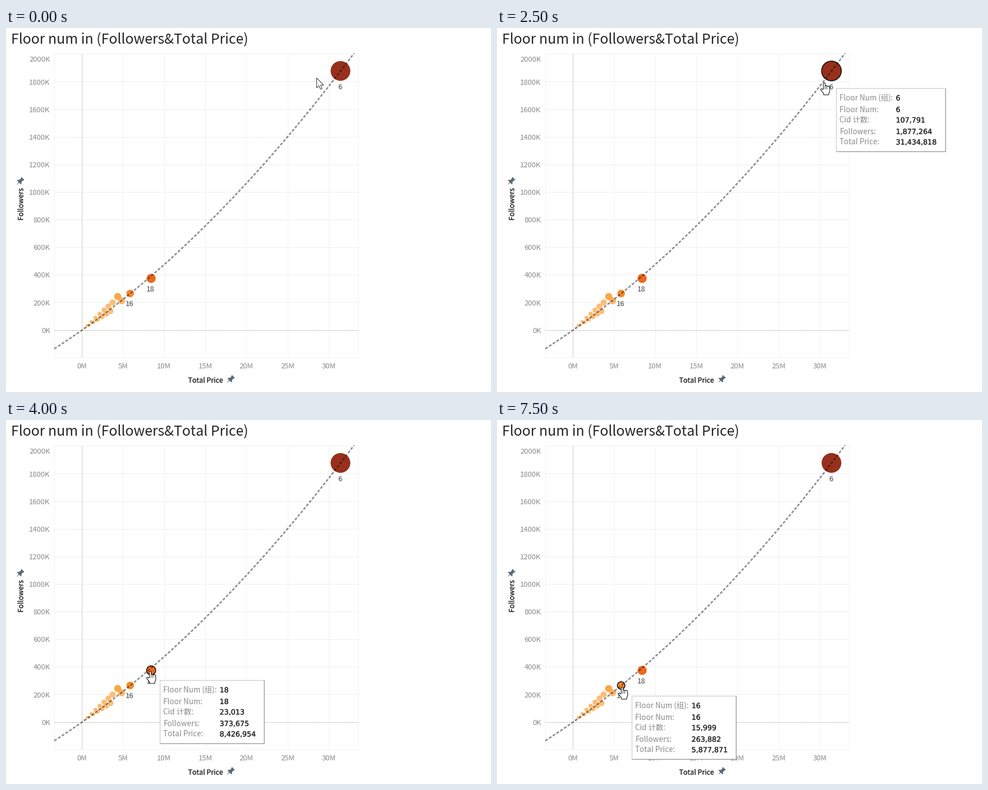
A matplotlib script for the animation above (8 s loop, 864 by 648 pixels).

```python
import numpy as np
import matplotlib.pyplot as plt
from matplotlib.animation import FuncAnimation
from matplotlib.patches import Circle, Polygon, Rectangle
from matplotlib.patheffects import withStroke

W, H = 864, 648
STEP_MS, STEPS = 500, 16
SANS, WIDE = "Noto Sans CJK JP", "DejaVu Sans"
GRAY, INK, SLATE = "#8a8a8a", "#262626", "#5a6877"
FAINT, MID = "#f1f1f1", "#b4b4b4"
LEFT, RIGHT, TOP, BOTTOM = 85.5, 626.5, 45.5, 585.5

plt.rcParams["lines.scale_dashes"] = False

# At 72 dpi one point is one pixel.
fig = plt.figure(figsize=(W / 72, H / 72), dpi=72, facecolor="white")
ax = fig.add_axes([0, 0, 1, 1])
ax.set_xlim(0, W)
ax.set_ylim(H, 0)
ax.axis("off")


def x_of(price):
    return 135 + 14.66e-6 * price


def y_of(followers):
    return 537.5 - 0.2456e-3 * followers


def r_of(count):
    return 0.0535 * np.sqrt(count)


def text(x, y, s, size, color=GRAY, font=SANS, z=1, bold=0, **kw):
    t = ax.text(x, y, s, fontsize=size, color=color, family=font, zorder=z,
                va="baseline", **kw)
    if bold:
        t.set_path_effects([withStroke(linewidth=bold, foreground=color)])
    return t


def line(xs, ys, color, width=1, dash=None, z=1, cap="butt", **kw):
    style = (0, dash) if dash else "-"
    return ax.plot(xs, ys, color=color, lw=width, ls=style, zorder=z,
                   dash_capstyle="butt", solid_capstyle=cap, **kw)[0]


def shape(points, origin, fill, edge="none", width=0, z=1):
    return ax.add_patch(Polygon(np.array(points) + origin, fc=fill, ec=edge,
                                lw=width, zorder=z, joinstyle="round"))


def disc(x, y, r, fill, edge="none", width=0, z=3):
    return ax.add_patch(Circle((x, y), r, fc=fill, ec=edge, lw=width,
                               zorder=z))


# ---- static chart ----

def pin(x, y):
    half = np.array([(3.5, -8), (3.5, -6.3), (2.4, -5.5), (2.8, -1.5),
                     (5, .5), (5, 2), (.8, 2), (0, 8.5)])
    outline = np.vstack([half, half[::-1] * (-1, 1)])
    c = np.sqrt(.5)
    shape(outline @ np.array([[c, c], [-c, c]]), (x, y), SLATE)


def draw_grid():
    for m in range(0, 31, 5):
        x = x_of(m * 1e6)
        if m:
            line([x, x], [TOP, BOTTOM], FAINT)
        text(x, 606.5, f"{m}M", 13, ha="center")
    for k in range(0, 2001, 200):
        y = y_of(k * 1e3)
        if 0 < k < 2000:
            line([LEFT - 1, RIGHT], [y, y], "#e6e6e6", dash=(2, 1))
        text(78.5, max(y + .5, 55) + 4.7, f"{k}K", 13, ha="right")
    line([LEFT, RIGHT, RIGHT, LEFT, LEFT],
         [TOP, TOP, BOTTOM, BOTTOM, TOP], FAINT)
    line([x_of(0)] * 2, [TOP, BOTTOM], MID, dash=(2, 1))
    line([LEFT, RIGHT], [y_of(0)] * 2, MID, dash=(2, 1))


def draw_titles():
    text(9.3, 28.5, "Floor num in (Followers&Total Price)", 24.85, INK)
    text(324.5, 631.3, "Total Price", 12.4, INK, bold=.1)
    text(30.5, 314, "Followers", 12.7, INK, bold=.1, rotation=90,
         rotation_mode="anchor", ha="center")
    pin(399.5, 626)
    pin(24.5, 273.5)


# Floor: count, followers, total price, colour.
FLOORS = {"16": (15999, 263882, 5877871, "#f28a2c"),
          "18": (23013, 373675, 8426954, "#ea6a1c"),
          "6": (107791, 1877264, 31434818, "#97301c")}


def place(name):
    count, followers, price, _ = FLOORS[name]
    return x_of(price), y_of(followers), r_of(count)


def draw_marks():
    # Minor floors keep close to a fixed count and follower rate per price.
    for i, price in enumerate(np.linspace(1e5, 3.75e6, 15)):
        rate = .046 + .007 * (-1) ** i
        disc(x_of(price), y_of(rate * price), r_of(.0028 * price), "#fcbd78")
    disc(206, 485.5, 6.2, "#fbb56a")
    disc(199, 478, 6.3, "#f9a848")
    for name, record in FLOORS.items():
        x, y, r = place(name)
        disc(x, y, r, record[-1])
        text(x - 1, y + r + 15.3, name, 13.2, "#404040", z=4, ha="center")


def draw_trend():
    x = np.linspace(86, 620, 200)
    u = x - 86
    y = 571 - .75 * u - .000649 * u * (x - 258)
    line(x, y, "black", 2.6, (5, 3), z=5, alpha=.45)


# ---- pointer and tooltip ----

def arrow(x, y):
    outline = [(0, 0), (0, 17.5), (4, 13.8), (6.8, 20), (9.6, 18.8),
               (6.9, 12.8), (12.4, 12.6)]
    return [shape(outline, (x, y), "white", "#333333", 1, z=20)]


def hand(x, y):
    palm = [(-1, 12), (9.3, 12), (9.3, 15.5), (7.6, 19), (7.6, 21.5),
            (-.8, 21.5), (-.8, 19.5), (-4, 14)]
    fingers = [((2.8 * i, 2.8 * i), (1.8 + 4.2 * min(i, 1) + .8 * i, 14))
               for i in range(4)]
    strokes = fingers + [((-4.8, 0), (12.6, 18))]
    parts = []
    # A wide dark pass under a narrow white one leaves the outline.
    for color, grow, z in (("black", 1, 20), ("white", 0, 21)):
        parts += [line(np.add(xs, x), np.add(ys, y), color, 2.2 + 2 * grow,
                       z=z, cap="round") for xs, ys in strokes]
        parts.append(shape(palm, (x, y), color, color, 2 * grow, z=z))
    return parts


LABELS = ["Floor Num (组):", "Floor Num:", "Cid 计数:", "Followers:",
          "Total Price:"]


def box(x, y, w, h, fill, edge="none", z=10):
    return ax.add_patch(Rectangle((x, y), w, h, fc=fill, ec=edge, lw=1,
                                  zorder=z))


def tooltip(name, x, y):
    values = [name, name] + [f"{v:,}" for v in FLOORS[name][:3]]
    w, h = 104 + 9 * len(values[-1]), 112
    parts = [box(x + 1, y + 1, w + 2, h + 2, "#d0d0d0"),
             box(x + 1.5, y + 1.5, w + 1, h + 1, "#adadad"),
             box(x + .5, y + .5, w, h, "white", "#c4c4c4", z=11)]
    for i, (label, value) in enumerate(zip(LABELS, values)):
        base = y + 23 + 19.6 * i + i % 2
        parts.append(text(x + 7.3, base, label, 13.4, z=12))
        parts.append(text(x + 107.5, base, value, 12.7, INK, WIDE, z=12,
                          bold=.25))
    return parts


def hover(name, tip):
    """Outline a mark; its tooltip hangs off the last point inside it."""
    x, y, r = place(name)
    offset = np.subtract(tip, (x, y))
    reach = min(1, .95 * r / np.hypot(*offset))
    corner = np.round((x, y) + offset * reach + (16, 15))
    return [disc(x, y, r, "none", "black", 1.4, z=6)] + tooltip(name, *corner)


# First step, pointer tip, hovered floor.
SCENES = [(0, (553.5, 89), None), (1, (587, 85), "6"), (5, (583, 97), "6"),
          (6, (373.5, 440), None), (7, (283, 453.5), None),
          (8, (257, 447), "18"), (13, (244.5, 484), None),
          (14, (223, 475), "16")]
live = []


def reset():
    while live:
        live.pop().remove()
    return []


def update(step):
    reset()
    _, tip, name = [s for s in SCENES if s[0] <= step][-1]
    if name:
        live.extend(hover(name, tip) + hand(*tip))
    else:
        live.extend(arrow(*tip))
    return live


draw_grid()
draw_titles()
draw_marks()
draw_trend()

anim = FuncAnimation(fig, update, frames=STEPS, init_func=reset,
                     interval=STEP_MS, repeat=True, repeat_delay=0, blit=False)
plt.show()
```
